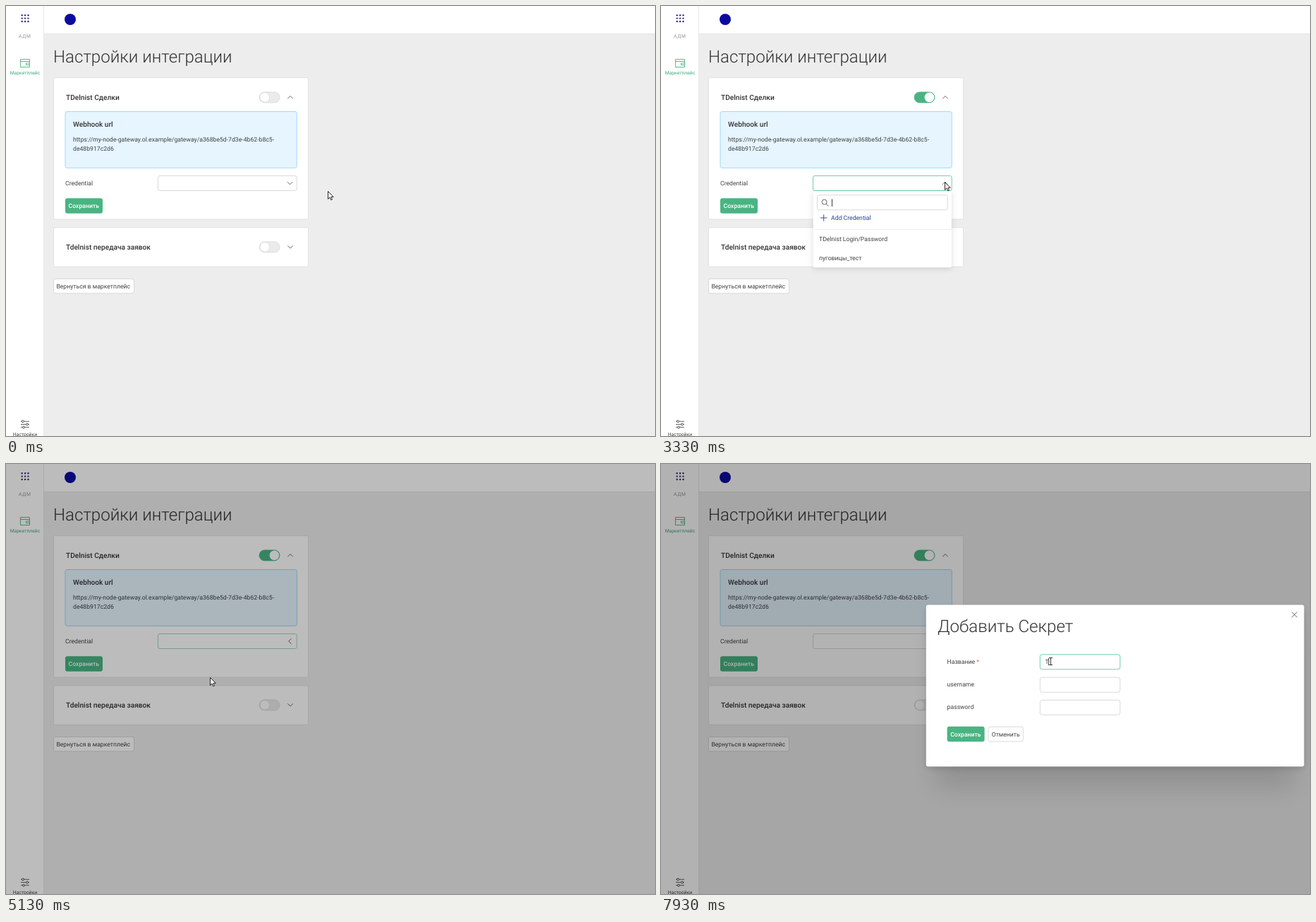
An HTML page that plays this animation: 920x609 px, repeating every 8 s.

```html
<!DOCTYPE html>
<html lang="ru">
<head>
<meta charset="utf-8">
<title>Настройки интеграции</title>
<style>
html, body { margin: 0; width: 100%; height: 100%; overflow: hidden; background: #ededed; }
svg { display: block; width: 100%; height: 100%; }
text { font: 8.67px Roboto, Arial, sans-serif; fill: #404040; text-rendering: geometricPrecision; white-space: pre; }
.h1 { font-size: 24.12px; font-weight: 300; fill: #333; }
.h2 { font-size: 10.15px; font-weight: 500; fill: #333; }
.small { font-size: 6.75px; }
.btn { font-weight: 500; fill: #fff; }
.line { fill: none; stroke: #555; stroke-width: .9; }
.green { fill: #49b482; }
</style>
</head>
<body>
<svg viewBox="0 0 920 609" id="stage"></svg>
<script>
const LOOP = 8000, GREEN = [73, 180, 130], FOCUS = [112, 207, 170], GREY = [217, 217, 217];

// Markup helpers
const box = (x, y, w, h, r = 0, attrs = 'fill="#fff" stroke="#d9d9d9"') =>
  `<rect x="${x}" y="${y}" width="${w}" height="${h}" rx="${r}" ${attrs}/>`;
const text = (x, y, s, cls = '', attrs = '') => `<text x="${x}" y="${y}" class="${cls}" ${attrs}>${s}</text>`;
const path = (d, attrs = '') => `<path class="line" d="${d}" ${attrs}/>`;
const chevron = (x, y, turn, id = '') =>
  `<g transform="translate(${x} ${y})"><path class="line" id="${id}" d="M-3.7 -1.9L0 1.8L3.7 -1.9" transform="rotate(${turn})"/></g>`;
const save = (x, y) => box(x, y, 53, 21.5, 3, 'class="green"') + text(x + 4.6, y + 14.1, 'Сохранить', 'btn');
const toggle = (y, id) => `<g id="${id}">
  ${box(358.2, y - 8.3, 30.8, 16.6, 8.3, 'class="halo" fill="#cfd4d2" opacity="0"')}
  ${box(359, y - 7.4, 29, 15, 7.5, 'class="track" fill="#ebebeb" stroke="#d6d6d6" stroke-width=".8"')}
  <circle class="knob" cx="366.8" cy="${y + .1}" r="6.8" fill="#fff" stroke="#d2d2d2" stroke-width=".6"/></g>`;

let dots = '';
for (let i = 0; i < 9; i++) dots += box(21.6 + i % 3 * 4.4, 12 + (i / 3 | 0) * 4.4, 2.2, 2.2, .6, 'fill="#2c2b7c"');

const sliders = [[588.3, 24], [592.5, 30], [596.7, 25]].map(([y, x]) =>
  path(`M21 ${y}H33`) + `<circle cx="${x}" cy="${y}" r="1.5" fill="#fff" stroke="#444" stroke-width=".9"/>`).join('');

const sidebar = box(0, 0, 54, 609, 0, 'fill="#fff"') + path('M53.5 0V609', 'style="stroke:#e6e6e6"') + dots +
  text(18, 45.2, 'АДМ', 'small', 'letter-spacing=".7" style="fill:#8b9893"') +
  path('M20.5 75.5H33.5V86.5H20.5ZM20.5 78.5H33.5M28.5 81H33.5M28.5 81V83.5H33.5', 'style="stroke:#49b482"') +
  text(5.7, 97.4, 'Маркетплейс', 'small green', 'style="fill:#3fa878"') +
  sliders + text(9.7, 608.8, 'Настройки', 'small');

const page = box(0, 0, 920, 609, 0, 'fill="#ededed"') + box(54, 0, 866, 39.5, 0, 'fill="#fff"') +
  path('M54 39.5H920', 'style="stroke:#e3e3e3"') + sidebar +
  '<circle cx="91" cy="19" r="8" fill="#0b0ba0"/>' +
  text(67, 80, 'Настройки интеграции', 'h1') +
  box(67.5, 101.5, 361, 200.5, 2, 'fill="#fff" stroke="#e2e2e2"') +
  text(85, 132.8, 'TDelnist Сделки', 'h2') + toggle(129.3, 'deals') + chevron(403, 129.3, 180) +
  box(84, 149.5, 328.3, 79.8, 2.5, 'fill="#e6f5ff" stroke="#9fdaf8"') +
  text(95, 170.5, 'Webhook url', 'h2') +
  text(95, 191.8, 'https://my-node-gateway.ol.example/gateway/a368be5d-7d3e-4b62-b8c5-') +
  text(95, 205, 'de48b917c2d6') +
  text(84, 253.8, 'Credential') +
  box(215.5, 240.5, 196.7, 21, 2.5, 'id="select" fill="#fff"') + chevron(402.5, 251, 0, 'arrow') +
  save(84, 272.3) +
  box(67.5, 313.8, 361, 55.5, 2, 'fill="#fff" stroke="#e2e2e2"') +
  text(85, 344.9, 'Tdelnist передача заявок', 'h2') + toggle(341.3, 'orders') + chevron(403, 341.3, 0) +
  box(67.5, 386.5, 114, 20.4, 2.5) + text(71.4, 399.8, 'Вернуться в маркетплейс');

const menu = `<g id="menu">
  ${box(215.8, 262, 196, 108.3, 2, 'fill="#fff" style="filter:drop-shadow(0 2px 4px #0002)"')}
  ${box(221.5, 267.8, 184.7, 21, 2.5)}
  <circle cx="231.6" cy="277.6" r="3.5" class="line"/>${path('M234.2 280.2L237.5 283.5')}
  ${path('M242.5 273.5V284', 'id="searchCaret" style="stroke:#222"')}
  ${path('M226 300H235.4M230.7 295.3V304.7', 'style="stroke:#233f9b"')}
  ${text(241, 303.2, 'Add Credential', '', 'style="fill:#233f9b"')}
  ${path('M216 316.3H411.8', 'style="stroke:#ececec"')}
  ${text(224, 332.8, 'TDelnist Login/Password')}${text(224, 359.6, 'пуговицы_тест')}</g>`;

const modal = `<g id="modal">
  ${box(390, 235, 506, 224, 10, 'opacity=".12" style="filter:blur(17px)"')}
  ${box(377, 204, 534, 226, 4, 'opacity=".18" style="filter:blur(5px)"')}
  ${box(375.8, 199.6, 535.8, 228.9, 3, 'fill="#fff"')}
  ${text(392, 237.8, 'Добавить Секрет', 'h1')}
  ${path('M894 209.5L901.7 217.2M901.7 209.5L894 217.2')}
  ${text(405.6, 283.2, 'Название <tspan style="fill:#e5673a">*</tspan>')}
  ${text(405.6, 315.2, 'username')}${text(405.6, 347.2, 'password')}
  ${box(537.3, 269.8, 113.5, 21, 3, 'id="field" fill="#fff"')}
  ${box(537.3, 302.2, 113.5, 21, 3)}${box(537.3, 334.3, 113.5, 21, 3)}
  ${text(544.5, 283.2, '', '', 'id="typed"')}
  ${path('M0 275V285', 'id="caret" style="stroke:#222"')}
  ${save(405.6, 371.8)}
  ${box(464, 372.2, 49.3, 20.8, 2.5)}${text(468.7, 385.9, 'Отменить')}</g>`;

const pointer = `<g id="pointer">
  <path id="hand" d="M.5 .5V11.4L3 9L4.8 12.8L6.5 12L4.8 8.4H8.2Z" fill="#fff" stroke="#111" stroke-width=".9"/>
  <path id="beam" class="line" style="stroke:#222" d="M-2.5 -5H2.5M-2.5 5H2.5M0 -5V5"/></g>`;

stage.innerHTML = page + menu + box(0, 0, 920, 609, 0, 'id="shade"') + modal + pointer;

const $ = id => document.getElementById(id);
const deals = s => document.querySelector('#deals .' + s);
const set = (el, values) => { for (const k in values) el.setAttribute(k, values[k]); };
const ramp = (t, a, b) => Math.min(1, Math.max(0, (t - a) / (b - a)));
const pulse = (t, a, b, c, d) => ramp(t, a, b) - ramp(t, c, d);
const mix = (a, b, k) => `rgb(${a.map((v, i) => v + (b[i] - v) * k)})`;
const blink = age => age >= 0 && age % 1060 < 530 ? 1 : 0;

// Pointer stops: time, x, y
const stops = [[0, 456, 262], [20, 456, 262], [130, 420, 224], [200, 420, 224], [270, 420, 222], [740, 420, 222],
  [1330, 367, 123], [1680, 367, 123], [1870, 450, 75], [1990, 535, 60], [2130, 577, 135], [2300, 520, 200],
  [2530, 403, 249], [2730, 402, 249], [3740, 402, 249], [4600, 289, 302], [5200, 289, 302], [5400, 443, 276],
  [5500, 490, 263], [5640, 530, 260], [5850, 552.5, 279.5], [LOOP, 552.5, 279.5]];

function slope(i, axis) {
  const a = stops[i - 1], b = stops[i], c = stops[i + 1];
  const still = (p, q) => p[1] === q[1] && p[2] === q[2];
  return !a || !c || still(a, b) || still(b, c) ? 0 : (c[axis] - a[axis]) / (c[0] - a[0]);
}

function pointerAt(t) {
  let i = 0;
  while (stops[i + 1][0] <= t) i++;
  const a = stops[i], b = stops[i + 1], d = b[0] - a[0], u = (t - a[0]) / d;
  const k = u * u * (3 - 2 * u);
  return [1, 2].map(n => a[n] + (b[n] - a[n]) * k +
    d * u * (1 - u) * ((1 - u) * slope(i, n) - u * slope(i + 1, n)));
}

// Typing: time, field contents
const keys = [[6070, ''], [6800, 'T'], [7270, 'Td'], [7400, 'Tde'], [7800, 'Td'], [7930, 'T']];

function draw(t) {
  const [x, y] = pointerAt(t);
  set($('pointer'), { transform: `translate(${x} ${y})` });
  const overField = t > 5500 && x > 537;
  set($('hand'), { opacity: overField ? 0 : 1 });
  set($('beam'), { opacity: overField ? 1 : 0 });

  const on = ramp(t, 1690, 1900);
  set(deals('halo'), { opacity: pulse(t, 1500, 1530, 3070, 3270) });
  set(deals('track'), { fill: mix([235, 235, 235], GREEN, on), stroke: mix([214, 214, 214], GREEN, on) });
  set(deals('knob'), { cx: 366.8 + 13.6 * on, 'stroke-opacity': 1 - on });

  set($('select'), { stroke: mix(GREY, FOCUS, pulse(t, 2540, 2730, 5040, 5240)) });
  set($('arrow'), { transform: `rotate(${180 * pulse(t, 3070, 3270, 5050, 5210)})` });
  const open = pulse(t, 3040, 3270, 4780, 4940);
  set($('menu'), { opacity: open, transform: `translate(0 262) scale(1 ${.8 + .2 * open}) translate(0 -262)` });
  set($('searchCaret'), { opacity: blink(t - 3300) });

  set($('shade'), { opacity: .3 * ramp(t, 4992, 5150) });
  const show = ramp(t, 5150, 5450), scale = 1 - .8 * (1 - show) ** 3;
  set($('modal'), { opacity: Math.min(1, show * 1.3),
    transform: `translate(289 302) scale(${scale}) translate(-289 -302)` });

  set($('field'), { stroke: mix(GREY, FOCUS, ramp(t, 5930, 6070)) });
  const key = keys.filter(k => k[0] <= t).pop() || [LOOP, ''];
  $('typed').textContent = key[1];
  const width = key[1] ? $('typed').getComputedTextLength() : 0;
  set($('caret'), { opacity: blink(t - key[0]), transform: `translate(${544.5 + width} 0)` });
}

const start = performance.now();
(function tick() {
  draw((performance.now() - start) % LOOP);
  requestAnimationFrame(tick);
})();
</script>
</body>
</html>
```
